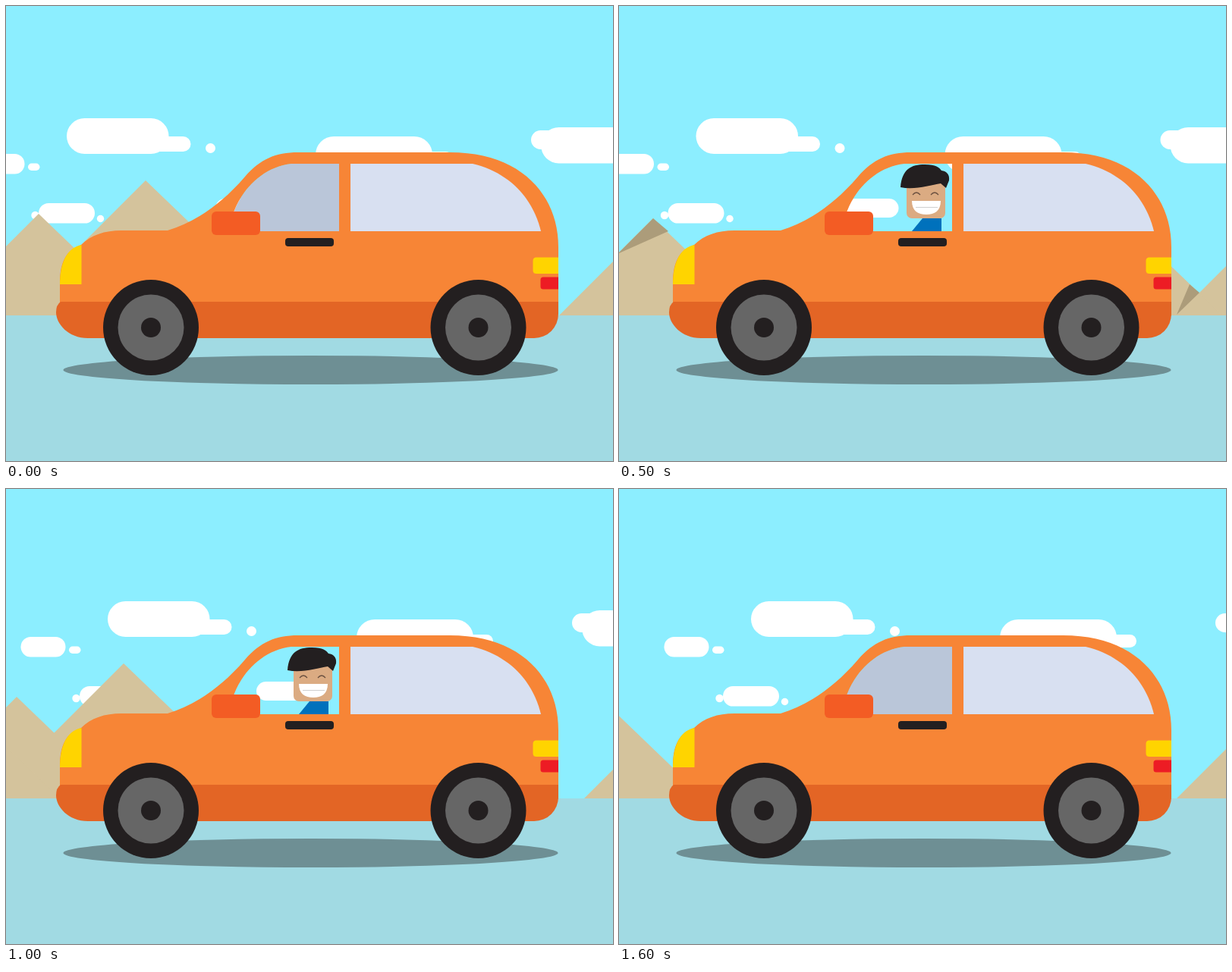
Recreate the animation shown at these times as an HTML page. Size 800 px wide and 600 px high, loop 1700 ms.

```html
<!DOCTYPE html>
<html lang="en">
<head>
<meta charset="utf-8">
<title>Road trip</title>
<style>
  html, body { margin: 0; width: 100%; height: 100%; overflow: hidden; background: #8ceeff; }
  svg { display: block; width: 800px; height: 600px; }
</style>
</head>
<body>
<svg viewBox="0 0 800 600">
  <defs>
    <path id="pane" d="M300 297V272C312 240 340 212 376 208H439V297Z"/>
    <clipPath id="opening"><use href="#pane"/></clipPath>
    <g id="wheel">
      <circle r="63" fill="#231f20"/>
      <circle r="43.5" fill="#666"/>
      <circle r="13" fill="#231f20"/>
    </g>
  </defs>

  <rect width="800" height="600" fill="#8ceeff"/>

  <g id="clouds" fill="#fff">
    <rect x="80" y="148" width="134.500" height="47" rx="23.500"/>
    <rect x="180" y="172" width="63.500" height="20" rx="10"/>
    <circle cx="269.500" cy="187.500" r="6.500"/>
    <rect x="-34.500" y="195" width="59" height="26.500" rx="13.200"/>
    <rect x="29" y="207.500" width="15.500" height="9.500" rx="4.700"/>
    <rect x="43" y="260" width="74" height="26.500" rx="13.200"/>
    <circle cx="38.500" cy="276" r="5.200"/>
    <circle cx="124.500" cy="280.500" r="4.700"/>
    <rect x="276" y="254" width="71" height="25" rx="12.500"/>
    <rect x="408" y="172" width="154" height="48" rx="24"/>
    <rect x="500" y="192" width="88" height="17" rx="8.500"/>
    <rect x="692" y="164" width="70" height="25" rx="12.500"/>
    <rect x="705" y="160" width="160" height="47.500" rx="23.700"/>
  </g>

  <g id="hills" fill="#d4c39c"></g>
  <rect y="408" width="800" height="192" fill="#a1dae3"/>
  <ellipse cx="401.500" cy="480" rx="326" ry="19" fill="#6e8f94"/>

  <g clip-path="url(#opening)">
    <path d="M386 297L400 280H425V297Z" fill="#0071bc"/>
    <rect x="379" y="222" width="51" height="58" rx="7" fill="#dbab82"/>
    <path d="M371 239C373 215 385 209 403 209C418 209 422 213 425 217C432 218 436 222 435 230L431 240L424 234C410 236 390 243 371 239Z" fill="#231f20"/>
    <path d="M387 249Q392 243 397 249M411 249Q416 243 421 249" fill="none" stroke="#6b5140" stroke-width="1.300"/>
    <path d="M386 257H424C424 270 416 275 405 275S386 270 386 257Z" fill="#fff"/>
    <path d="M391 265.500H420" stroke="#cfcfcf"/>
    <use id="glass" href="#pane" fill="#bac6d9"/>
  </g>

  <path fill="#f78536" fill-rule="evenodd" d="M71 391V366C71 340 78 322 99 315C112 302 130 296 152 296H213C250 285 285 260 315 225C335 202 355 193 385 193H585C680 193 728 250 728 318V391Z
    M300 297V272C312 240 340 212 376 208H439V297Z"/>
  <path d="M72 390H728V406A32 32 0 0 1 696 438H108C82 438 66 419 66 404Q66 394 72 390Z" fill="#e36525"/>
  <path d="M99.500 315V367H71C71 343 78 319 99.500 315Z" fill="#ffd400"/>
  <path d="M454 208H615C665 220 695 255 705 297H454Z" fill="#d8e0f1"/>
  <rect x="271" y="271" width="64" height="31" rx="6" fill="#f35c24"/>
  <rect x="368" y="306" width="64" height="11" rx="4" fill="#231f20"/>
  <path d="M728 331.500H699Q694.500 331.500 694.500 336V348.500Q694.500 353 699 353H728Z" fill="#ffd400"/>
  <path d="M728 357.500H708Q704.500 357.500 704.500 361V370Q704.500 373.500 708 373.500H728Z" fill="#ed1c24"/>
  <use href="#wheel" x="191" y="424"/>
  <use href="#wheel" x="622.500" y="424"/>
</svg>

<script>
const STEP = 100, LOOP = 1700, BASE = 409;
const $ = id => document.getElementById(id);

// A peak with a 45 degree left side and a slightly flatter right side
const peak = (x, y) => `M${x - (BASE - y)} ${BASE}L${x} ${y}L${x + (BASE - y) * 1.04} ${BASE}Z`;

const tall = peak(0, 230);
const pair = tall + peak(-141, 274);

// Ridges: outline, shaded part, [step, x] keys
const ridges = [
  [pair, '', [[0, 184], [3, 632], [5, 1010], [6, 1190]]],
  [tall, '', [[0, 907], [2, 1260]]],
  [peak(0, 280), 'M0 280L20 297L-47 327Z', [[3, -329], [5, 45], [6, 230], [8, 590]]],
  [peak(0, 280), 'M90 367L103 378L73 407Z', [[4, 490], [5, 662], [6, 850], [7, 1040]]],
  [tall + peak(143, 274), 'M109 307L94 322L129 355V335Z', [[7, 493], [8, 671], [10, 1060]]],
  [pair, '', [[6, -380], [8, -22], [10, 155], [12, 553], [15, 1105]]],
  [tall, '', [[9, 760], [10, 940], [11, 1120]]],
  [pair, '', [[10, -114], [12, 291], [16, 1010]]],
  [tall, '', [[14, -430], [16, -72]]]
];
const drift = [[0, 0], [3, 14], [5, 21.5], [8, 37], [10, 54], [12, 63.5], [16, 94]];
const drop = [[0, 0], [1, 4], [3, 34], [5, 92], [10, 92], [11, 82], [12, 64], [13, 40], [14, 18], [15, 4], [16, 0]];

// Linear value between keys; undefined outside them
function at(keys, s) {
  for (let i = 1; i < keys.length; i++) {
    const [a, x] = keys[i - 1], [b, y] = keys[i];
    if (s >= a && s <= b) return x + (y - x) * (s - a) / (b - a);
  }
}

function addPath(parent, d, fill) {
  const p = document.createElementNS('http://www.w3.org/2000/svg', 'path');
  p.setAttribute('d', d);
  if (fill) p.setAttribute('fill', fill);
  parent.appendChild(p);
  return p;
}

const parts = [];
for (const [d, , keys] of ridges) parts.push([addPath($('hills'), d), keys]);
for (const [, d, keys] of ridges) if (d) parts.push([addPath($('hills'), d, '#ac9c7a'), keys]);

const move = (el, x, y) => el.setAttribute('transform', `translate(${x} ${y})`);

function draw(s) {
  move($('clouds'), at(drift, s), 0);
  move($('glass'), 0, at(drop, s));
  for (const [el, keys] of parts) {
    const x = at(keys, s);
    el.style.display = x === undefined ? 'none' : '';
    if (x !== undefined) move(el, x, 0);
  }
}

const start = performance.now();
function tick() {
  const t = Math.max(0, performance.now() - start) % LOOP;
  draw(Math.floor(t / STEP));
  requestAnimationFrame(tick);
}
tick();
</script>
</body>
</html>
```
